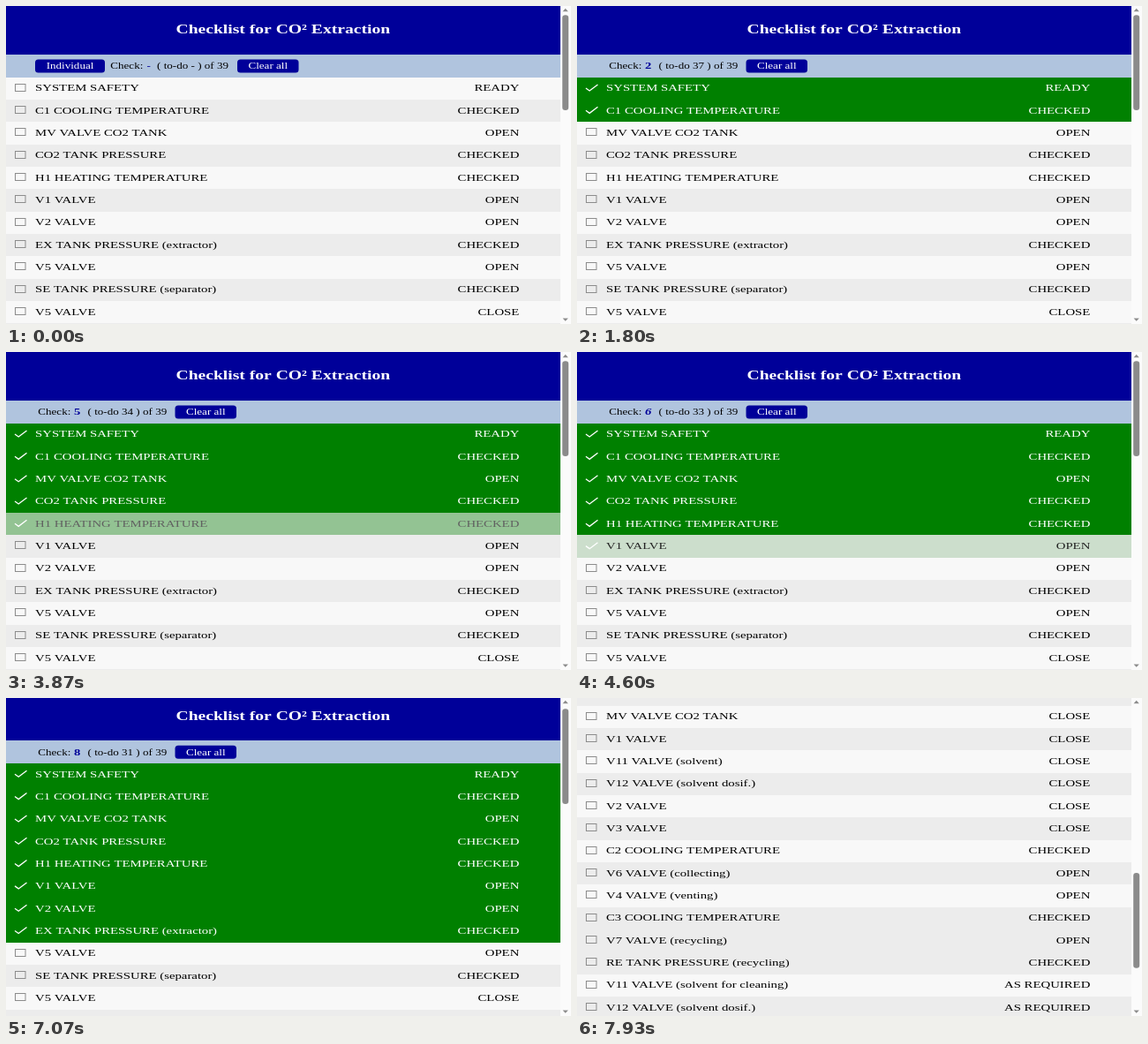
Recreate the animation shown at these times as an HTML page with a canvas. Size 640 by 360 pixels, loop 8 s.

```html
<!DOCTYPE html>
<html lang="en">
<head>
<meta charset="utf-8">
<title>Checklist</title>
<style>
  html, body { margin: 0; width: 100%; height: 100%; overflow: hidden; background: #fff; }
  canvas { display: block; width: 640px; height: 360px; }
</style>
</head>
<body>
<canvas id="stage" width="640" height="360"></canvas>
<script>
const ctx = document.getElementById('stage').getContext('2d');
const LOOP = 8000, TOTAL = 39, PAGE_W = 628;
const SX = 0.8165, SY = 0.6;               // page pixels to stage pixels
const LIST_TOP = 80.7, PITCH = 25.33, ROW_FONT = 18.1;
const BLUE = '#000099', DARK = '#ececec', LIGHT = '#f8f8f8';
const SERIF = '"Liberation Serif", "Times New Roman", serif';

const STATUS = { R: 'READY', C: 'CHECKED', O: 'OPEN', X: 'CLOSE', A: 'AS REQUIRED' };
const ROWS = `SYSTEM SAFETY|R
C1 COOLING TEMPERATURE|C
MV VALVE CO2 TANK|O
CO2 TANK PRESSURE|C
H1 HEATING TEMPERATURE|C
V1 VALVE|O
V2 VALVE|O
EX TANK PRESSURE (extractor)|C
V5 VALVE|O
SE TANK PRESSURE (separator)|C
V5 VALVE|X
V3 VALVE|O
H2 HEATING TEMPERATURE|C
V11 VALVE (solvent)|O
V12 VALVE (solvent dosif.)|O
EX TANK PRESSURE (extractor)|C
V5 VALVE|O
SE TANK PRESSURE (separator)|C
H3 HEATING TEMPERATURE|C
EXTRACTION TIME|C
V5 VALVE|X
CO2 TANK PRESSURE|C
MV VALVE CO2 TANK|X
V1 VALVE|X
V11 VALVE (solvent)|X
V12 VALVE (solvent dosif.)|X
V2 VALVE|X
V3 VALVE|X
C2 COOLING TEMPERATURE|C
V6 VALVE (collecting)|O
V4 VALVE (venting)|O
C3 COOLING TEMPERATURE|C
V7 VALVE (recycling)|O
RE TANK PRESSURE (recycling)|C
V11 VALVE (solvent for cleaning)|A
V12 VALVE (solvent dosif.)|A
V6 VALVE (collecting)|X`.split('\n').map(line => line.split('|'));

const CLICKS = [800, 1530, 2270, 2925, 3800, 4564, 5330, 6000];
const HOVERS = [400, 1270, 1930, 2600, 3470, 4200, 5000, 5670];
const FADE = 300;

const clamp = v => Math.max(0, Math.min(1, v));
const smooth = p => p * p * (3 - 2 * p);
const glide = (t, from, to) => smooth(clamp((t - from) / (to - from)));

// cubic-bezier(.25, .1, .25, 1)
function ease(x) {
  let lo = 0, hi = 1;
  const bez = (u, a, b) => 3 * u * (1 - u) * (1 - u) * a + 3 * u * u * (1 - u) * b + u ** 3;
  for (let i = 0; i < 20; i++) {
    const mid = (lo + hi) / 2;
    if (bez(mid, 0.25, 0.25) < x) lo = mid; else hi = mid;
  }
  return bez(lo, 0.1, 1);
}

const scrollAt = t => 330 * glide(t, 7033, 7480) + 300 * glide(t, 7635, 7940);

function mix(a, b, p) {
  return `rgb(${a.map((v, i) => Math.round(v + (b[i] - v) * p)).join()})`;
}

function text(str, x, y, size, color, { style = '', align = 'left' } = {}) {
  ctx.save();
  ctx.translate(x, y);
  ctx.scale(SX, SY);
  ctx.font = `${style} ${size}px ${SERIF}`;
  ctx.textAlign = align;
  ctx.fillStyle = color;
  ctx.fillText(str, 0, 0);
  ctx.restore();
}

function rect(x, y, w, h, color, radius = 0) {
  ctx.fillStyle = color;
  ctx.beginPath();
  ctx.roundRect(x, y, w, h, radius);
  ctx.fill();
}

// Full-width band with edges on whole pixels.
function band(y0, y1, color) {
  const top = Math.round(y0);
  rect(0, top, PAGE_W, Math.round(y1) - top, color);
}

function button(label, x, w, y) {
  rect(x, y + 60.6, w, 14.8, BLUE, 3.5);
  text(label, x + w / 2, y + 71.4, 16, '#fff', { align: 'center' });
}

function drawHeader(t, y) {
  band(y, y + 54.6, BLUE);
  text('Checklist for CO² Extraction', 313.8, y + 31.3, 24, '#fff', { style: 'bold', align: 'center' });
  band(y + 54.6, y + LIST_TOP, '#b0c4de');

  const done = CLICKS.filter(c => t >= c).length;
  const base = y + 71.4;
  if (!done) {
    button('Individual', 33, 79, y);
    text('Check:', 118.3, base, 16, '#000');
    text('-', 159.5, base, 16, BLUE);
    text('( to-do - ) of 39', 252, base, 16, '#000', { align: 'right' });
    button('Clear all', 262, 69.5, y);
    return;
  }
  const fresh = t - CLICKS[done - 1] < 70;
  text('Check:', 36.3, base, 16, '#000');
  text(done, 77, base, 18, BLUE, { style: fresh ? 'italic bold' : 'bold' });
  text(`( to-do ${TOTAL - done} ) of ${TOTAL}`, 182.2, base, 16, '#000', { align: 'right' });
  button('Clear all', 191.5, 69.5, y);
}

function drawBox(cy) {
  const y = Math.round(cy - 4) - 0.5;
  ctx.strokeStyle = '#8c8c8c';
  ctx.lineWidth = 1;
  ctx.strokeRect(10.5, y, 11.5, 8);
}

function drawCheck(cy) {
  ctx.strokeStyle = '#fff';
  ctx.lineWidth = 1.3;
  ctx.beginPath();
  ctx.moveTo(10, cy + 0.2);
  ctx.lineTo(14.2, cy + 3.2);
  ctx.lineTo(23.5, cy - 3.8);
  ctx.stroke();
}

function drawRow(i, t, y, hovered) {
  const [name, code] = ROWS[i];
  const checked = t >= CLICKS[i];
  const p = checked ? ease(clamp((t - CLICKS[i]) / FADE)) : 0;
  const plain = hovered || i % 2 ? DARK : LIGHT;
  const ink = mix([0, 0, 0], [255, 255, 255], p);
  band(y, y + PITCH, checked ? mix([236, 236, 236], [0, 128, 0], p) : plain);

  const cy = y + 12.1;
  if (checked) drawCheck(cy); else drawBox(cy);
  text(name, 33, cy + 3.6, ROW_FONT, ink);
  text(STATUS[code], 581.3, cy + 3.6, ROW_FONT, ink, { align: 'right' });
}

function arrow(y, dir) {
  ctx.fillStyle = '#8b8b8b';
  ctx.beginPath();
  ctx.moveTo(630.6, y + 1.6 * dir);
  ctx.lineTo(636.8, y + 1.6 * dir);
  ctx.lineTo(633.7, y - 1.8 * dir);
  ctx.fill();
}

function drawScrollbar(scroll) {
  rect(PAGE_W, 0, 640 - PAGE_W, 360, '#fbfbfb');
  arrow(4.6, 1);
  arrow(355, -1);
  rect(630.2, 10.2 + scroll * 0.2984, 7, 107.8, '#8b8b8b', 3.3);
}

function draw(t) {
  const scroll = scrollAt(t);
  ctx.fillStyle = LIGHT;
  ctx.fillRect(0, 0, 640, 360);
  drawHeader(t, -scroll);

  // The pointer rests on the last visited row and stays put while scrolling.
  const visited = HOVERS.filter(h => t >= h).length - 1;
  const pointerY = LIST_TOP + (visited + 0.5) * PITCH;
  const hoverRow = visited < 0 ? -1 : Math.floor((pointerY + scroll - LIST_TOP) / PITCH);
  ROWS.forEach((_, i) => {
    const y = LIST_TOP + i * PITCH - scroll;
    if (y > -PITCH && y < 360) drawRow(i, t, y, i === hoverRow);
  });
  drawScrollbar(scroll);
}

const start = performance.now();
function frame() {
  draw((performance.now() - start) % LOOP);
  requestAnimationFrame(frame);
}
frame();
</script>
</body>
</html>
```
